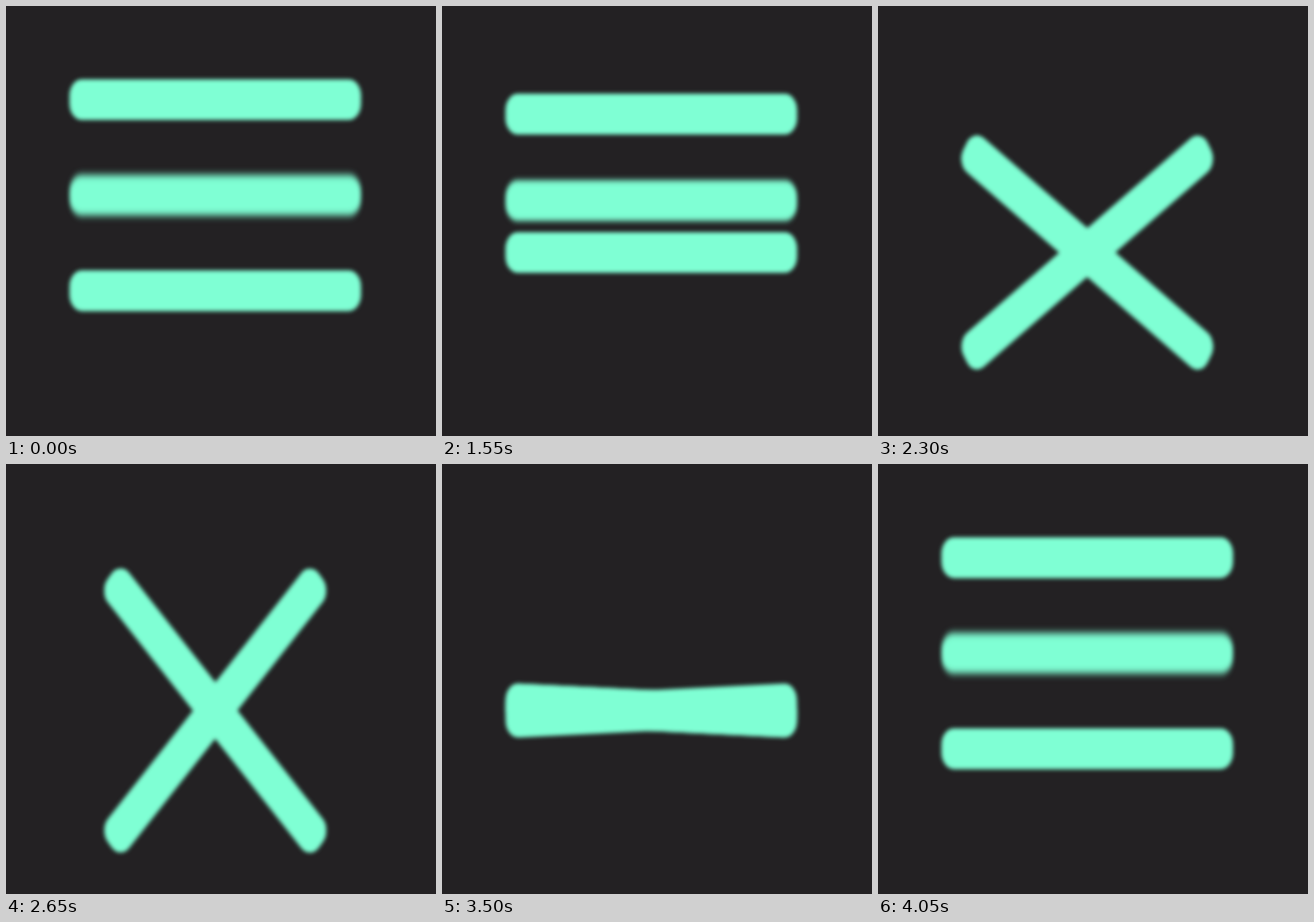
Recreate the animation shown at these times as an HTML page. Size 450 px wide and 450 px high, loop 6350 ms.

```html
<!DOCTYPE html>
<html lang="en">
<head>
<meta charset="utf-8">
<title>Menu icon</title>
<style>
  html, body { margin: 0; width: 100%; height: 100%; overflow: hidden; background: #232123; }
  svg { display: block; width: 100%; height: 100%; }
</style>
</head>
<body>
<svg viewBox="0 0 450 450">
  <defs>
    <filter id="soft" filterUnits="userSpaceOnUse" x="0" y="0" width="450" height="450" color-interpolation-filters="sRGB">
      <feGaussianBlur stdDeviation="2.1"/>
    </filter>
    <filter id="smear" filterUnits="userSpaceOnUse" x="0" y="0" width="450" height="450" color-interpolation-filters="sRGB">
      <feGaussianBlur id="smearBlur" stdDeviation="0 3"/>
    </filter>
    <rect id="bar" x="-152.6" y="-16" width="305.2" height="32" rx="13"/>
  </defs>
  <g fill="#7fffd4" filter="url(#soft)">
    <use id="top" href="#bar"/>
    <g id="midLayer"><use id="mid" href="#bar"/></g>
    <use id="low" href="#bar"/>
  </g>
</svg>
<script>
const LOOP = 6350, STEP = 50, CENTER = 258;
const [topBar, midBar, lowBar, midLayer, smearBlur] =
  ['top', 'mid', 'low', 'midLayer', 'smearBlur'].map(id => document.getElementById(id));

// CSS "ease": cubic-bezier(.25, .1, .25, 1)
function ease(x) {
  if (x <= 0) return 0;
  if (x >= 1) return 1;
  const bez = (a, b, s) => 3 * a * s * (1 - s) ** 2 + 3 * b * s * s * (1 - s) + s ** 3;
  let lo = 0, hi = 1;
  for (let i = 0; i < 24; i++) {
    const s = (lo + hi) / 2;
    if (bez(.25, .25, s) < x) lo = s; else hi = s;
  }
  return bez(.1, 1, lo);
}

const ramp = (t, start, length) => ease((t - start) / length);

// The icon is taller than wide: bars rotate first, then stretch vertically.
function place(bar, y, angle) {
  bar.setAttribute('transform', `translate(219 ${y}) scale(1 1.3333) rotate(${angle})`);
}

function draw(t) {
  const gather = ramp(t, 1500, 500) - ramp(t, 3581, 480);
  const angle = 45 * (ramp(t, 1842, 1040) - ramp(t, 3281, 300));
  const lowCentered = t > 1500 && t < 3581;

  place(topBar, 98 + (CENTER - 98) * gather, angle);
  place(midBar, 198 + (CENTER - 198) * gather, angle);
  place(lowBar, lowCentered ? CENTER : 298, -angle);

  // The middle bar has softer edges near its resting place.
  if (gather < .3) {
    smearBlur.setAttribute('stdDeviation', `0 ${3 * (1 - gather / .3) + .01}`);
    midLayer.setAttribute('filter', 'url(#smear)');
  } else {
    midLayer.removeAttribute('filter');
  }
}

const begin = performance.now();
function tick() {
  const t = (performance.now() - begin) % LOOP;
  draw(Math.floor(t / STEP) * STEP);
  requestAnimationFrame(tick);
}
tick();
</script>
</body>
</html>
```
